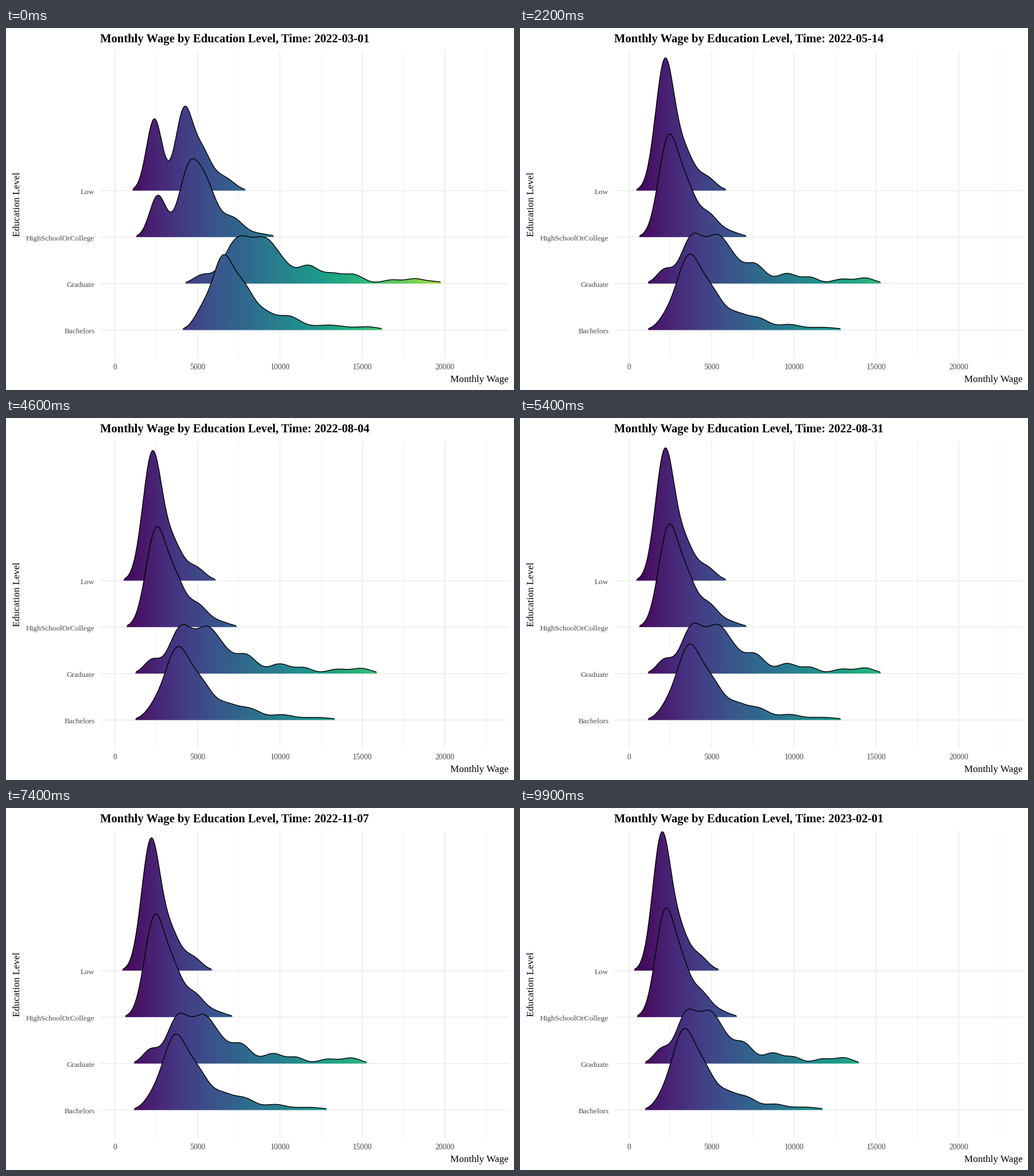
These frames come from a looping animation (885 px wide and 632 px high, 10 s). A matplotlib script:

```python
import numpy as np
import matplotlib.pyplot as plt
from matplotlib.animation import FuncAnimation
from matplotlib.patches import Polygon

W, H, DPI = 885, 632, 100
FRAMES = 100
LEFT, RIGHT, TOP, BOTTOM = 163, 875, 40, 576
X0, PER_1000 = 189.7, 28.71             # wage axis in pixels
BASE, STEP = 283.4, 81.15               # first baseline, row spacing
GRID = np.linspace(195.4, 842.6, 512)   # density sample positions
CUT = 2.4                               # lower parts of a ridge are hidden
BANDWIDTH = 12.5                        # smoothing, the same every month

# Each density is a sum of bell curves: (centre, height, spread) in pixels.
# "first" is March, "usual" is any later month with 22 working days.
LEVELS = {
    "Low": dict(
        first=[(258, 125, 13.7), (309.5, 137, 15), (341, 64, 16),
               (379, 22, 17.5)],
        usual=[(252, 226, 16.3), (287, 60, 16), (324, 23, 16)]),
    "HighSchoolOrCollege": dict(
        first=[(264, 72, 14.2), (319, 118, 18), (350, 74, 17),
               (393, 33, 19), (440, 5.5, 20)],
        usual=[(258, 170, 17.2), (291, 73, 16), (327, 38, 17),
               (364, 9, 18)]),
    "Graduate": dict(
        first=[(341, 14, 15), (402, 73, 23), (453, 73, 24), (488, 9, 14),
               (526, 31, 19), (569, 15, 16), (605, 15.3, 17),
               (672, 6.5, 16.5), (712, 8.2, 15), (745, 3.5, 14)],
        usual=[(251, 23, 13.5), (299, 79, 19), (345, 80, 21),
               (376, 14, 14), (408, 34, 18), (465, 17.5, 17),
               (505, 10.5, 14), (560, 7.7, 16), (601, 9.7, 16)]),
    "Bachelors": dict(
        first=[(343.5, 35, 15.5), (376, 110, 16.5), (411, 76, 20),
               (452, 23, 17), (492, 23, 20), (562, 8.7, 30),
               (631, 5.2, 19)],
        usual=[(256, 19, 16), (293, 122, 20), (333, 62, 20), (377, 24, 18),
               (415, 19.5, 19), (468, 9, 18), (525, 4.8, 28)]),
}

# Timeline: one density per month, blended linearly in between.
START = np.datetime64("2022-03-01")
MONTHS = np.arange("2022-03", "2023-03", dtype="datetime64[M]")
WORKDAYS = np.busday_count(MONTHS, MONTHS + 1)
OFFSETS = (MONTHS.astype("datetime64[D]") - START).astype(int)
SPAN = int(OFFSETS[-1])
KEYS = np.rint(OFFSETS * (FRAMES - 1) / SPAN).astype(int)


def density(bumps, days=22):
    """Pay grows with the days worked, the smoothing stays the same."""
    centre, height, spread = np.array(bumps, float).T
    s = days / 22
    wide = np.sqrt(BANDWIDTH ** 2 + (spread ** 2 - BANDWIDTH ** 2) * s * s)
    z = (GRID[:, None] - X0 - (centre - X0) * s) / wide
    return (height * spread / wide * np.exp(-z * z / 2)).sum(axis=1)


def pt(px):
    return px * 72 / DPI


plt.rcParams["font.family"] = "Liberation Serif"
fig = plt.figure(figsize=(W / DPI, H / DPI), dpi=DPI, facecolor="white")
ax = fig.add_axes([0, 0, 1, 1])
ax.axis("off")


def label(x, y, s, size, color="black", **kw):
    return ax.text(x, y, s, fontsize=pt(size), color=color,
                   va="baseline", **kw)


def rule(xs, ys, width):
    ax.plot(xs, ys, color="#ebebeb", lw=pt(width), zorder=0,
            solid_capstyle="butt", snap=False)


for k in range(10):
    x = X0 + 2.5 * k * PER_1000
    rule([x, x], [TOP, BOTTOM], 0.7 if k % 2 else 1.4)
    if k % 2 == 0:
        label(x, 595, str(2500 * k), 13.6, "#4d4d4d", ha="center")

title = label(163, 25, "", 20.7, weight="bold")
label(875, 617, "Monthly Wage", 17.1, ha="right")
label(23.5, 364, "Education Level", 17.1, rotation=90,
      rotation_mode="anchor")


class Ridge:
    shades = plt.get_cmap("viridis")(np.linspace(0, 1, len(GRID)))[None]

    def __init__(self, row, name, first, usual):
        self.base = BASE + STEP * row
        rule([LEFT, RIGHT], [self.base] * 2, 1.4)
        label(154, self.base + 5.9, name, 13.4, "#4d4d4d", ha="right")
        self.curves = [density(first)]
        self.curves += [density(usual, days) for days in WORKDAYS[1:]]
        z = 2 + 2 * row
        self.shape = Polygon([(0, 0), (1, 0), (1, 1)], fc="none", ec="none")
        ax.add_patch(self.shape)
        self.fill = ax.imshow(
            self.shades, extent=(GRID[0], GRID[-1], self.base + 1, 30),
            aspect="auto", interpolation="nearest", zorder=z)
        self.line, = ax.plot([], [], color="black", lw=pt(1.4), zorder=z + 1,
                             solid_joinstyle="round", solid_capstyle="butt")

    def show(self, k, t):
        h = self.curves[k] * (1 - t) + self.curves[k + 1] * t
        seen = h >= CUT
        outline = np.column_stack([GRID, self.base - np.where(seen, h, 0)])
        ends = [(GRID[-1], self.base), (GRID[0], self.base)]
        self.shape.set_xy(np.vstack([outline, ends]))
        self.fill.set_clip_path(self.shape)
        self.line.set_data(GRID, np.where(seen, self.base - h, np.nan))


ridges = [Ridge(row, name, **bumps)
          for row, (name, bumps) in enumerate(LEVELS.items())]
ax.set_xlim(-0.5, W - 0.5)
ax.set_ylim(H - 0.5, -0.5)


def update(i):
    k = min(np.searchsorted(KEYS, i, side="right") - 1, len(KEYS) - 2)
    t = (i - KEYS[k]) / (KEYS[k + 1] - KEYS[k])
    for ridge in ridges:
        ridge.show(k, t)
    date = START + SPAN * i // (FRAMES - 1)
    title.set_text(f"Monthly Wage by Education Level, Time: {date}")


anim = FuncAnimation(fig, update, frames=FRAMES, interval=100, repeat=True,
                     repeat_delay=0, init_func=lambda: update(0), blit=False)
plt.show()
```
